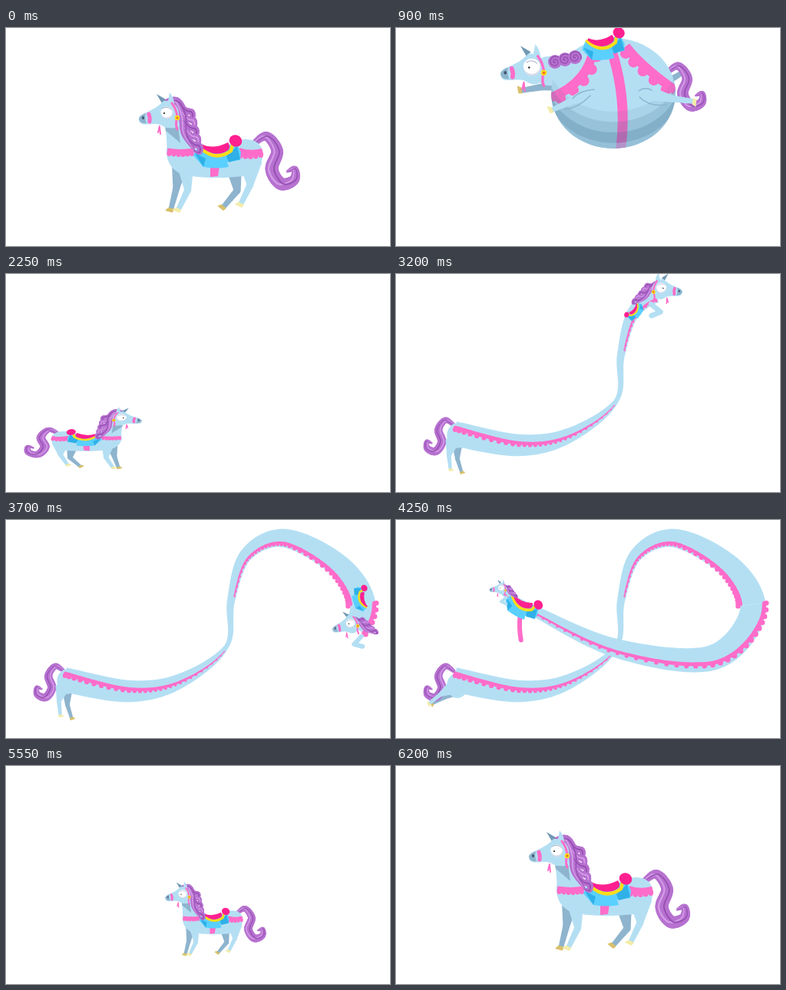
Animation, 500 px wide and 284 px high, one loop 6.3 s. Source, as an HTML page with a canvas:

```html
<!DOCTYPE html>
<html lang="en">
<head>
<meta charset="utf-8">
<title>Stretchy carousel horse</title>
<style>
html, body { margin: 0; width: 100%; height: 100%; overflow: hidden; background: #fff; }
canvas { display: block; }
</style>
</head>
<body>
<canvas id="stage" width="500" height="284"></canvas>
<script>
const g = document.getElementById('stage').getContext('2d');
const BLUE = '#b4dff3', SHADE = '#8eb4ce', DEEP = '#7199b5', PINK = '#ff6cc9', HOT = '#ff2090',
  YELLOW = '#ffdc18', CYAN = '#5ad0ff', SKY = '#2fb0e8', PURPLE = '#b772d0', LILAC = '#d49be8',
  PLUM = '#9650b2', HOOF = '#f3ecaa', FARHOOF = '#d8c06a';
const { PI, sin, cos, min, max, hypot, atan2 } = Math;

const mix = (a, b, k) => a + (b - a) * k;
const ease = k => k * k * (3 - 2 * k);
const span = (t, a, b) => min(1, max(0, (t - a) / (b - a)));

function fill(color, d) { g.fillStyle = color; g.fill(new Path2D(d)); }
function line(color, width, d) {
  g.strokeStyle = color; g.lineWidth = width; g.lineCap = g.lineJoin = 'round';
  g.stroke(new Path2D(d));
}
function oval(color, x, y, rx, ry = rx, r = 0) {
  g.fillStyle = color; g.beginPath(); g.ellipse(x, y, rx, ry, r, 0, 7); g.fill();
}
// Draws a part with its pivot (px, py) placed at (x, y).
function place(x, y, r, sx, sy, px, py, draw) {
  g.save(); g.translate(x, y); g.rotate(r); g.scale(sx, sy); g.translate(-px, -py); draw(); g.restore();
}
// Point on a smooth curve through the given points.
function spline(points, u) {
  const i = max(0, min(points.length - 2, Math.floor(u))), f = u - i;
  const p = n => points[min(points.length - 1, max(0, i + n))];
  return p(0).map((b, c) => {
    const a = p(-1)[c], d = p(1)[c], e = p(2)[c];
    return b + f / 2 * (d - a + f * (2 * a - 5 * b + 4 * d - e + f * (3 * (b - d) + e - a)));
  });
}
// Lock of hair: a stroke thick in the middle and thin at its ends.
function lock(color, width, points, shift = 0) {
  const end = points.length - 1;
  let last = points[0];
  for (let u = .1; u <= end; u += .1) {
    const [x, y] = spline(points, u), bulge = sin(PI * (.12 + .83 * u / end));
    const next = [x + shift * bulge, y];
    line(color, width * bulge, `M${last}L${next}`);
    last = next;
  }
}
// Scalloped ribbon along a quadratic curve.
function frill(x0, y0, x1, y1, x2, y2, n, r, width) {
  g.lineCap = 'butt'; g.strokeStyle = PINK; g.lineWidth = width;
  g.beginPath(); g.moveTo(x0, y0); g.quadraticCurveTo(x1, y1, x2, y2); g.stroke();
  for (let i = 0; i < n; i++) {
    const k = (i + .5) / n, j = 1 - k;
    const dx = j * (x1 - x0) + k * (x2 - x1), dy = j * (y1 - y0) + k * (y2 - y1), d = hypot(dx, dy);
    oval(PINK, j * j * x0 + 2 * j * k * x1 + k * k * x2 - dy / d * width / 2,
      j * j * y0 + 2 * j * k * y1 + k * k * y2 + dx / d * width / 2, r);
  }
}
function curl(x, y, r) {
  oval(PURPLE, x, y, r);
  g.strokeStyle = PLUM; g.lineWidth = 1.4; g.beginPath();
  for (let a = 0; a < 13; a += .4) g.lineTo(x + cos(a) * r * a / 14, y + sin(a) * r * a / 14);
  g.stroke();
}

function head(eye = 8) {
  fill(DEEP, 'M196 86L208 93L203 98Z');
  line(PINK, 2, 'M200 128L198 136M200 129L201 138');
  fill(BLUE, 'M173 118C174 110 192 110 205 95L211 95L213 84Q219 91 219 99C233 110 222 140 203 127C192 121 173 132 173 118Z');
  fill(SHADE, 'M173 118Q175 113 182 111Q180 117 183 124Q174 125 173 118Z');
  oval('#435570', 178.5, 117, 1.6, 2);
  line(PINK, 5, 'M186 112Q188 117 187 122');
  line(PINK, 3, 'M216 98Q222 105 223 116Q220 126 223 132');
  oval('#d6dbea', 209.5, 110.5, eye);
  oval('#fff', 209, 109.5, eye - .5, eye - 1);
  line('#a9b4cc', 1, 'M203 105Q210 101 215 106');
  oval('#222', 206, 111, 1.1);
  oval(YELLOW, 223, 117, 3.3);
  oval('#f36a20', 223, 117, 1.5);
}
function neck() {
  fill(BLUE, 'M206 122C209 140 210 150 209 163L247 166C242 145 232 130 228 108Z');
  fill(SHADE, 'M207 126Q216 134 224 128L227 150Q216 140 208 134Z');
}
function mane() {
  const spine = [[206, 97], [222, 96], [231, 115], [233, 138], [246, 160]];
  lock(PURPLE, 13, spine);
  for (let i = 0; i < 5; i++) {
    const x = 229 + 2.5 * i, y = 101 + 11 * i;
    const wave = [[x - 4, y - 4], [x + 5, y + 6], [x + 13, y + 9], [x + 13, y + 17], [x + 5, y + 15]];
    lock(PURPLE, 8, wave);
    lock(i % 2 ? LILAC : PLUM, 1.6, wave);
  }
  lock(LILAC, 2, spine, -2);
  lock(PLUM, 1.6, spine, 3);
}
function tail() {
  const sweep = [[322, 151], [339, 141], [353, 160], [346, 184], [358, 203], [375, 198], [376, 184], [366, 187]];
  lock(PURPLE, 17, sweep);
  lock(LILAC, 2.2, sweep, -4);
  lock(PLUM, 1.8, sweep, 3);
}
function saddle() {
  fill(CYAN, 'M251 153L244 166L257 181Q275 184 290 181L288 174L305 172L306 162L299 148L275 162Z');
  fill(SKY, 'M246 163L260 170L257 181ZM287 167L301 154L305 171L290 175Z');
  line(YELLOW, 4.5, 'M252 155Q272 175 293 160L295 152');
  fill(HOT, 'M254 151Q270 159 289 149Q294 156 288 160Q271 170 253 154Z');
  oval(HOT, 299, 147, 8.5, 7.5, .4);
}
// Two tapered segments; positive angles carry the foot to the left.
function leg(far, x, y, swing, bend, thigh = 20) {
  const color = far ? SHADE : BLUE;
  const bone = (a, b) => {
    fill(color, `M${-a / 2} 0L${a / 2} 0L${b / 2} 28L${-b / 2} 28Z`);
    oval(color, 0, 28, b / 2);
  };
  g.save(); g.translate(x, y); g.rotate(swing);
  oval(color, 0, 0, thigh / 2, 6);
  bone(thigh, 9);
  g.translate(0, 28); g.rotate(bend);
  bone(9, 6.5);
  fill(far ? FARHOOF : HOOF, 'M-4 27L4 27L3 32L-7 32Z');
  g.restore();
}

function horse({ x = 270, y = 242, r = 0, sx = 1, sy = 1, py = 242, run = 0, eye }) {
  place(x, y, r, sx, sy, 270, py, () => {
    leg(1, 226, 181, .15 - .9 * run, .1 + .9 * run);
    leg(1, 297, 184, -.15 - .6 * run, .85 - run);
    place(323, 150, -.75 * run, 1 - .35 * run, 1 - .35 * run, 323, 150, tail);
    const bend = -1.22 * run, size = 1 - .4 * run, c = cos(bend) * size, s = sin(bend) * size;
    place(228, 165, bend, size, size, 228, 165, neck);
    fill(BLUE, 'M209 157C222 154 236 155 246 157C265 166 285 155 300 147C315 142 331 146 334 160C336 176 326 190 310 193C285 196 250 196 232 191C215 187 208 172 209 157Z');
    leg(0, 234, 183, -.1 + .2 * run, .55 - .3 * run - 1.2 * run);
    leg(0, 318, 176, -1.3 * run, .45 - .5 * run, 30);
    fill(PINK, 'M266 180L278 180L276 193L266 194Z');
    frill(210, 160, 228, 163, 244, 160, 6, 3, 7);
    frill(334, 161, 318, 165, 303, 160, 0, 0, 8);
    frill(303, 162, 318, 166, 334, 161, 5, 3.2, 8);
    place(275, 160, 0, 1, mix(1, -.7, run), 275, 160, saddle);
    place(228, 165, bend, size, size, 228, 165, mane);
    const hs = 1 + .15 * run;
    place(228 - 9 * c + 43 * s, 165 - 9 * s - 43 * c, .15 * run, hs, hs, 219, 122, () => head(eye));
  });
}

function balloon(k) {
  const L = (a, b) => mix(a, b, k);
  const cx = L(272, 283), cy = L(170, 85), rx = L(62, 81), ry = L(25, 72);
  const ring = (a, b, c, d, e, f) =>
    frill(cx + a * rx, cy + b * ry, cx + c * rx, cy + d * ry, cx + e * rx, cy + f * ry, 5, L(4, 7), L(8, 12));
  leg(1, L(226, 218), L(181, 72), L(.15, 1.4), L(.1, 0));
  leg(1, L(297, 325), L(184, 80), L(-.15, -1.9), L(.85, -.2));
  place(L(323, 354), L(150, 57), 0, L(1, .84), L(1, .84), 323, 150, tail);
  line(BLUE, L(24, 38), `M${L(216, 198)} ${L(122, 56)}L${L(228, 238)} ${L(165, 55)}`);
  g.save();
  g.beginPath(); g.ellipse(cx, cy, rx, ry, 0, 0, 7); g.clip();
  g.fillStyle = BLUE; g.fillRect(0, -50, 500, 400);
  line(PINK, L(11, 13), `M${cx - 8} ${cy - ry}Q${cx + rx * .24} ${cy} ${cx + rx * .12} ${cy + ry}`);
  ring(.2, -.85, .45, -.48, 1, -.05);
  ring(-1, .08, -.4, -.2, -.32, -.8);
  for (let i = 3; i >= 0; i--) {
    const rise = ry * (.1 + .19 * i);
    g.fillStyle = i ? `rgba(64,105,140,${k * (.28 - .06 * i)})` : `rgba(180,222,243,${.35 * k})`;
    g.beginPath(); g.rect(0, -50, 500, 400);
    g.ellipse(cx, cy - rise, rx * 1.07, ry, 0, 0, 7);
    g.fill('evenodd');
  }
  g.restore();
  leg(0, L(234, 254), L(183, 84), L(-.1, 1.15), L(.55, 0));
  leg(0, L(318, 332), L(176, 86), L(0, -1.35), L(.45, -.1), L(30, 18));
  if (k > .6) line(SHADE, 1.5, 'M258 80Q238 82 230 92M253 88Q238 104 220 106M316 82Q324 76 333 81M317 90Q330 103 352 100');
  place(L(275, 270), L(165, 25), -.08 * k, L(1, .9), L(1, .95), 275, 165, saddle);
  for (let i = 0; i < 3; i++) curl(L(232, 207 + i * 13), L(105 + i * 20, 44 - i * 3), 9);
  place(L(219, 188), L(122, 64), 0, L(1, 1.13), L(1, 1.13), 219, 122, () => head(L(8, 10)));
}

function puddle(x, sx, sy) {
  place(x, 277, 0, sx, sy, 290, 277, () => {
    oval(BLUE, 290, 260, 99, 17, .05);
    oval(SHADE, 297, 255, 88, 15, .07);
    oval(DEEP, 240, 246, 19, 13);
    oval(HOOF, 232, 253, 5, 4);
    curl(381, 240, 15);
    for (let i = 0; i < 2; i++) {
      oval(BLUE, 308 - 8 * i, 250 - 7 * i, 74 - 12 * i, 21 - 2 * i, .08);
      frill(236 + 4 * i, 255 - 15 * i, 300 - 25 * i, 278 - 12 * i, 380 - 35 * i, 259, 12 - 3 * i, 4, 6);
    }
    line(BLUE, 10, 'M312 270Q332 274 342 254');
    line(SHADE, 1.3, 'M306 266Q324 262 338 249M311 277Q343 278 348 256');
    fill(SHADE, 'M246 227Q258 248 288 246Q320 246 330 232L280 200Z');
    fill(BLUE, 'M250 207C250 187 270 174 289 174C311 174 331 189 344 205L334 226C314 246 250 242 250 207Z');
    oval('#dfe1ed', 312, 218, 27, 25);
    fill('#fff', 'M285 214C286 197 300 191 315 191Q328 203 345 205Q335 211 336 224C323 234 287 232 285 214Z');
    oval('#222', 329, 231, 1.3);
    oval(BLUE, 244, 207, 8.5, 9);
    oval(DEEP, 242, 207, 3, 4);
    fill(PINK, 'M250 200Q259 201 257 217L251 219Q254 209 250 200Z');
    oval('#333', 253, 186, 1);
    fill(PURPLE, 'M294 178Q310 175 323 187L316 188L320 193L302 190L306 186L296 184Z');
    line(PLUM, 1.2, 'M298 179Q311 180 317 189M299 184Q308 184 313 190');
    fill(CYAN, 'M335 234L331 246L338 252L365 249L368 237Z');
    oval(HOT, 363, 231, 9, 8);
    line(YELLOW, 4, 'M335 236Q349 246 361 238');
    line(HOT, 6, 'M339 233Q349 239 357 235');
  });
}

// Course of the stretched body; the pinch is at PINCH, the ribbon changes sides at TWIST.
const PINCH = 3, TWIST = 7.8, TIP = 12;
const track = [[76, 208], [160, 223], [226, 210], [287, 165], [293, 105], [313, 45], [365, 24], [438, 64],
  [464, 122], [410, 180], [290, 168], [185, 121], [139, 92], [112, 50], [165, 34], [245, 46]];
const heading = u => {
  const [ax, ay] = spline(track, max(0, u - .05)), [bx, by] = spline(track, min(15, u + .05));
  return atan2(by - ay, bx - ax);
};
const girth = u =>
  u < PINCH ? 3 + 13 * cos(PI / 2 * u / PINCH) :
  u < 8.5 ? 3 + 14 * sin(PI / 2 * (u - PINCH) / 5.5) ** 1.5 :
  u < TIP ? 5 + 12 * cos(PI / 2 * (u - 8.5) / 3.5) ** 2 : min(14, 5 + 4 * (u - TIP));
const ribbonSide = u =>
  u < PINCH ? mix(-.5, .4, u / PINCH) :
  u < TWIST ? mix(.55, 1, span(u, 6, TWIST)) : mix(-.9, -.33, span(u, TWIST, 9.2));
// Point of the body at u, moved sideways by a share of its half width.
function flank(u, share) {
  const [x, y] = spline(track, u), a = heading(u), w = girth(u) * share;
  return [x - sin(a) * w, y + cos(a) * w];
}
function tube(from, to) {
  if (to <= from) return;
  const n = Math.ceil((to - from) * 12), us = Array.from({ length: n + 1 }, (_, i) => mix(from, to, i / n));
  fill(BLUE, 'M' + [...us.map(u => flank(u, -1)), ...us.reverse().map(u => flank(u, 1))].join('L') + 'Z');
}
function ribbon(from, to, side) {
  let last;
  for (let u = from; u <= to; u += .1) {
    const w = girth(u), share = ribbonSide(u), next = flank(u, share);
    if (last) line(PINK, w * .32, `M${last}L${next}`);
    oval(PINK, ...flank(u, share + side * .16), w * .2);
    last = next;
  }
}
// Places a part upright along the body, facing the way it travels.
function ride(u, size, turn, px, py, draw) {
  const a = heading(u), right = cos(a) > 0, tilt = right ? a : atan2(-sin(a), -cos(a));
  place(...spline(track, u), tilt * turn, right ? -size : size, size, px, py, draw);
}
function snake(u0, u1, kick = 0) {
  place(...spline(track, u0), u0 && heading(u0), -.65, .65, 318, 168, () => {
    leg(1, 312, 190, -kick * 1.1, .3 - kick * .3);
    place(320, 150, 0, 1, 1, 323, 150, tail);
    oval(BLUE, 312, 172 + 8 * kick, 21, 25);
    leg(0, 322, 184, -.25 - kick * .8, .35 - kick * .2, 28);
  });
  tube(u0, min(u1, TWIST));
  ribbon(u0, min(u1, PINCH), 1);
  ribbon(max(u0, 4.1), min(u1, TWIST), 1);
  tube(max(u0, TWIST), u1);
  ribbon(max(u0, TWIST), u1, -1);
  const seatAt = max(u0, u1 - .62), [x, y] = spline(track, seatAt);
  if (u1 > 11 && u1 < 12.5) line(PINK, 6, `M${x - 3} ${y + 12}Q${x - 5} ${y + 30} ${x - 2} ${y + 46}`);
  ride(seatAt, mix(.42, .75, ease(span(u1, 6, TIP))), 1, 275, 160, saddle);
  ride(u1, mix(.42, .75, span(Math.abs(u1 - TIP), 0, 5)), .1, 219, 122, () => {
    line(BLUE, 9, 'M228 138L212 152L228 158');
    place(219, 108, -.5, .75, .75, 222, 105, mane);
    head(9);
  });
}

// Runs head along the course: quick start, slower round the loop.
function reach(t) {
  if (t < 3200) return mix(.8, 5.55, span(t, 2650, 3200));
  return t < 3700 ? mix(5.55, 8.3, span(t, 3200, 3700)) : mix(8.3, 11.95, span(t, 3700, 4250));
}

function draw(t) {
  g.clearRect(0, 0, 500, 284);
  if (t < 250 || t >= 6200) horse({});
  else if (t < 400) horse({ sy: 1.03, eye: 9 });
  else if (t < 1100) balloon(ease(span(t, 350, 900)));
  else if (t < 1450) {
    const wobble = sin((t - 1100) / 40) * .03, drop = span(t, 1200, 1450) ** 2;
    place(283, 85 + drop * 118, 0, 1 - wobble, 1 + wobble, 283, 85, () => balloon(1));
  } else if (t < 1750) {
    const k = span(t, 1450, 1600);
    puddle(290, mix(.85, 1, k), mix(1.7, 1, ease(k)));
  } else if (t < 2050) {
    const k = ease(span(t, 1700, 2050));
    puddle(mix(290, 120, k), mix(1, .7, k), mix(1, 1.35, k));
  } else if (t < 2700) {
    const hop = span(t, 2050, 2400), crouch = sin(PI * span(t, 2400, 2700));
    const sy = .65 * (1 + .5 * sin(9 * hop - .7) * (1 - hop)) - .12 * crouch;
    horse({ x: 106 - 16 * crouch, y: 255, sx: -.65 * Math.sqrt(.65 / sy), sy, eye: 9 });
  } else if (t < 4350) snake(0, reach(t), span(t, 3950, 4250));
  else if (t < 5000) {
    const k = span(t, 4300, 4950);
    snake(14 * k * k, mix(11.95, 15, ease(k)), 1);
  } else if (t < 5400) {
    const k = span(t, 5000, 5400), fall = k * k;
    horse({ x: 163 + 125 * (1 - (1 - k) ** 8), y: 48 + 160 * fall, r: .26 * (1 - fall),
      sx: -.75, sy: .75, py: 170, run: 1 - fall, eye: 9 });
  } else if (t < 5700) {
    const k = span(t, 5400, 5600);
    horse({ x: 268, y: 262 - 18 * k, sx: mix(-.8, 1.1, k), sy: .72 - .14 * sin(PI * k), eye: 9 });
  } else {
    const k = span(t, 5650, 6200), swing = (1 - k) ** 1.5 * sin(k * 13);
    horse({ sx: 1 - swing * .16, sy: 1 + swing * .22, eye: 9 - k });
  }
}

const start = performance.now();
function tick() {
  const t = (performance.now() - start) % 6300;
  draw(Math.floor(t / 50) * 50);
  requestAnimationFrame(tick);
}
tick();
</script>
</body>
</html>
```
